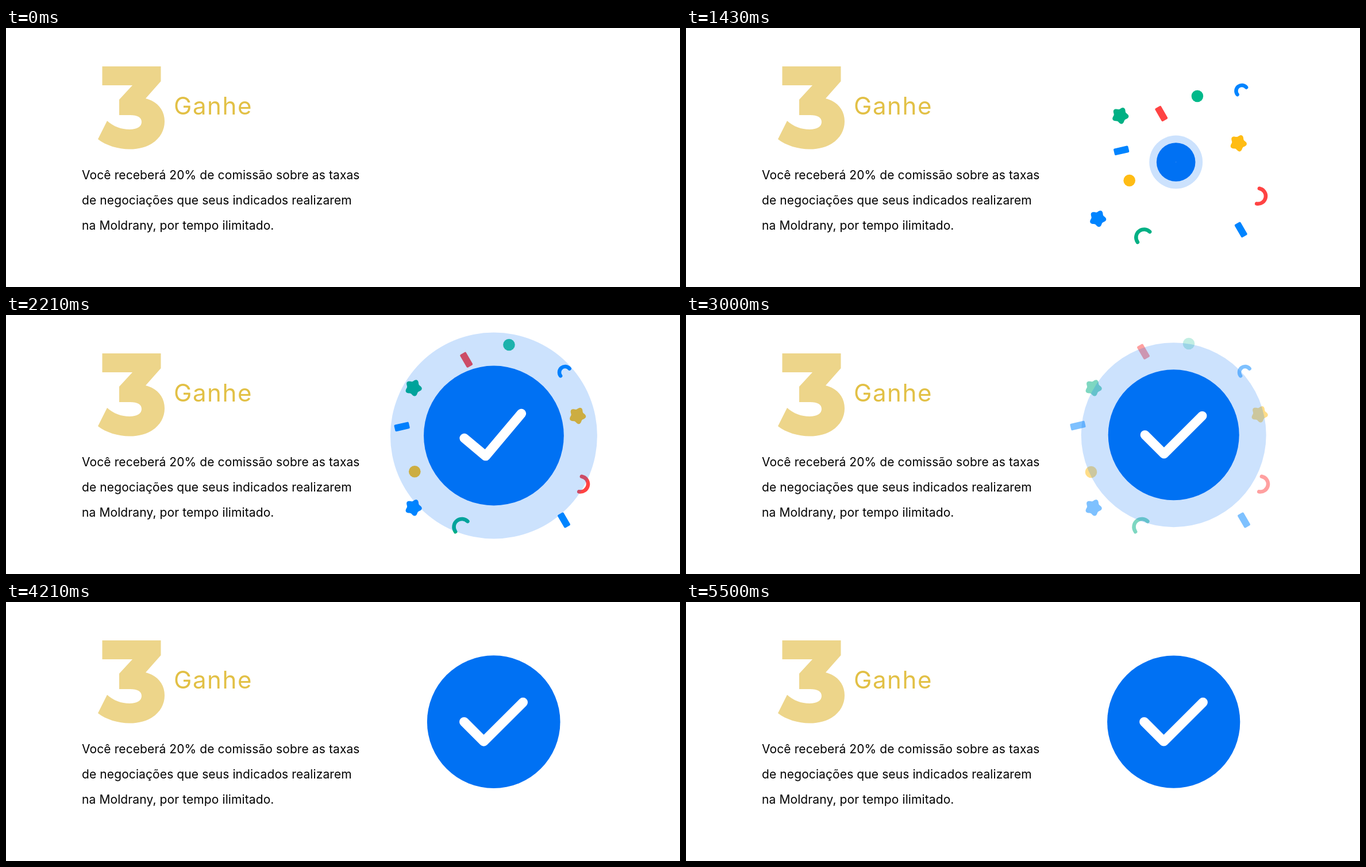
These frames come from a looping animation (1173x452 px, 7.21 s). An HTML page with a canvas:

```html
<!DOCTYPE html>
<html lang="pt">
<head>
<meta charset="utf-8">
<style>
  html, body { margin: 0; width: 100%; height: 100%; overflow: hidden; background: #fff; }
  svg, canvas { position: absolute; left: 0; top: 0; }
  text { font: 400 21px Inter, "Open Sans", sans-serif; letter-spacing: .1px; }
  .title { font-size: 42px; letter-spacing: 1.6px; fill: #e2c045; }
</style>
</head>
<body>
<svg width="1173" height="452">
  <path fill="#edd58a" d="M167.5 67H269.5V93L243 123C263 128 276 143 276 163C276 189 254 211.5 215 211.5C195 211.5 174 205 160 194L176 162C187 172 201 177 215 177C228 177 236 172 236 164C236 156 229 152 216 152H197V125L220 100H167.5Z"/>
  <text class="title" x="292" y="151">Ganhe</text>
  <text x="132" y="264">Você receberá 20% de comissão sobre as taxas</text>
  <text x="132" y="308">de negociações que seus indicados realizarem</text>
  <text x="132" y="352">na Moldrany, por tempo ilimitado.</text>
</svg>
<canvas id="stage" width="1173" height="452"></canvas>
<script>
const ctx = document.getElementById('stage').getContext('2d');
const LOOP = 7210, TAU = Math.PI * 2, RAD = Math.PI / 180;
const BLUE = '#0084ff', GREEN = '#00b084', RED = '#ff4343', YELLOW = '#ffbc14', DISC = '#0071f3';

const smooth = u => u * u * (3 - 2 * u);
const linear = u => u;
const ramp = (t, from, to) => smooth(Math.min(1, Math.max(0, (t - from) / (to - from))));

// Value at time t on a track of [time, value] keys.
function track(t, keys, ease = smooth) {
  if (t <= keys[0][0]) return keys[0][1];
  for (let i = 1; i < keys.length; i++) {
    const [t0, a] = keys[i - 1], [t1, b] = keys[i];
    if (t < t1) return a + (b - a) * ease((t - t0) / (t1 - t0));
  }
  return keys[keys.length - 1][1];
}

function disc(x, y, r, color) {
  ctx.fillStyle = color;
  ctx.beginPath();
  ctx.arc(x, y, Math.max(0, r), 0, TAU);
  ctx.fill();
}

const dot = color => () => disc(0, 0, 10.3, color);

const bar = (color, angle) => () => {
  ctx.rotate(angle * RAD);
  ctx.fillStyle = color;
  ctx.beginPath();
  ctx.roundRect(-13, -6, 26, 12, 2);
  ctx.fill();
};

const star = color => () => {
  ctx.fillStyle = color;
  ctx.beginPath();
  for (let a = 0; a < 360; a += 4) {
    const r = 12.9 + 1.9 * Math.cos(5 * (a - 7) * RAD);
    ctx.lineTo(r * Math.cos(a * RAD), r * Math.sin(a * RAD));
  }
  ctx.fill();
};

const arc = (color, r, from, to) => () => {
  ctx.strokeStyle = color;
  ctx.lineWidth = 6.5;
  ctx.beginPath();
  ctx.arc(0, 0, r, from * RAD, to * RAD);
  ctx.stroke();
};

// draw, end x, end y, arrival time, start x, start y, departure time, fade start
const confetti = [
  [star(GREEN), 709, 127, 2150, 888, 226],
  [bar(RED, 60), 796, 64, 2650, 867, 258],
  [dot('#00b98a'), 875, 50, 2350, 919, 253, 0, 1800],
  [arc(BLUE, 10, 142, 320), 973, 100, 1650, 888, 251, 250],
  [star(YELLOW), 998, 173, 2500, 904, 244],
  [arc(RED, 13.5, -80, 100), 999.5, 295, 1620],
  [bar(BLUE, 60), 971, 358, 1700, 893, 270],
  [arc(GREEN, 14, 144, 315), 793.5, 370, 1620],
  [star(BLUE), 709, 336, 1630],
  [dot(YELLOW), 705, 274, 2500, 875, 254],
  [bar(BLUE, -13), 682, 193, 2500, 875, 246],
];

function drawConfetti(t) {
  for (const [draw, x, y, arrive, x0 = 893, y0 = 251, leave = 0, fade = 2450] of confetti) {
    const s = ramp(t, leave, arrive), size = ramp(t, 0, 700);
    ctx.save();
    ctx.globalAlpha = 1 - ramp(t, fade, 3560);
    ctx.translate(x0 + (x - x0) * s, y0 + (y - y0) * s);
    ctx.scale(size, size);
    draw();
    ctx.restore();
  }
}

function drawBadge(t) {
  const rise = 1 - ramp(t, 975, 2380);
  const radius = track(t, [[975, 0], [2300, 123.5], [3000, 114], [3570, 117], [4430, 115.6]]);
  const halo = track(t, [[975, 0], [2380, 187.5], [2475, 187.5], [3753, 115.6]]);
  ctx.save();
  ctx.translate(848.7 + 5.3 * rise, 209.2 + 33 * rise);
  if (t < 3753) disc(0, 0, halo, 'rgba(0,113,243,.2)');
  disc(0, 0, radius, DISC);

  if (t > 4600 && t < 5500) {
    const x = track(t, [[4600, -335], [4860, -272], [5360, 183], [5500, 290]], linear);
    ctx.save();
    ctx.clip();
    disc(x, x * 0.675 + 43, 260, '#008cfa');
    ctx.restore();
  }

  const size = track(t, [[1380, 0], [2300, 1.03], [3000, 0.975], [3570, 1.012], [4430, 1]]);
  if (size > 0) {
    ctx.rotate(-30 * RAD * (1 - ramp(t, 1380, 2500)));
    ctx.scale(size, size);
    ctx.strokeStyle = '#fff';
    ctx.lineWidth = 16.5;
    ctx.beginPath();
    ctx.moveTo(-51.3, 0);
    ctx.lineTo(-17.2, 34.1);
    ctx.lineTo(51, -34.1);
    ctx.stroke();
  }
  ctx.restore();
}

function render(now) {
  const t = now % LOOP;
  ctx.clearRect(0, 0, 1173, 452);
  drawConfetti(t);
  drawBadge(t);
}

ctx.lineCap = ctx.lineJoin = 'round';
const start = performance.now();
(function frame() {
  render(performance.now() - start);
  requestAnimationFrame(frame);
})();
</script>
</body>
</html>
```
